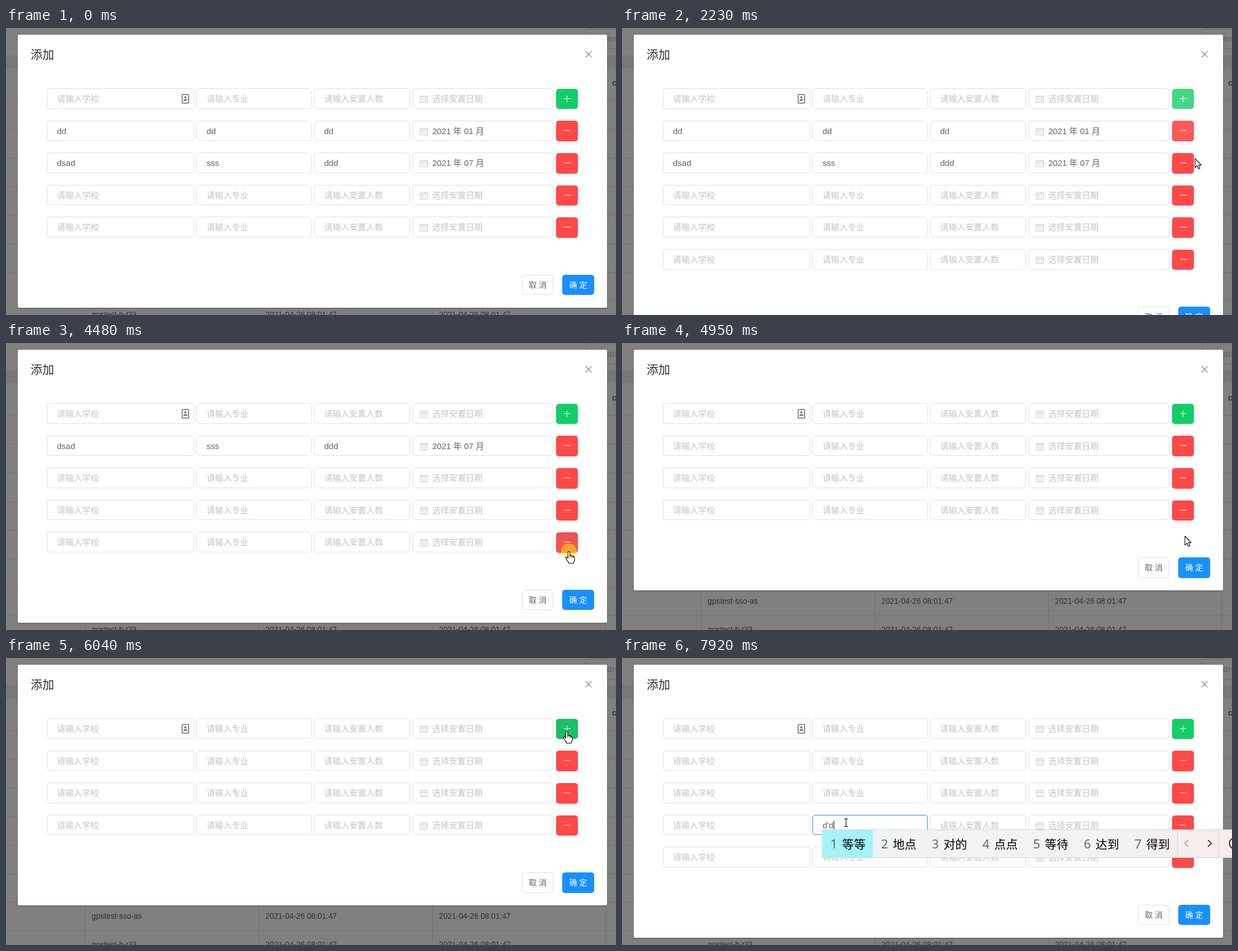
Write an HTML page that moves like this. It is 1089 px wide and 514 px high and loops after 8 s.

```html
<!DOCTYPE html>
<html lang="zh-CN">
<head>
<meta charset="utf-8">
<title>添加</title>
<style>
html, body { margin: 0; width: 100%; height: 100%; overflow: hidden; }
body { position: relative; background: #808080; font: 15px/35px "Liberation Sans", "Noto Sans CJK SC", "Noto Sans CJK", sans-serif; color: #606266; }
body *, svg { position: absolute; box-sizing: border-box; white-space: nowrap; }
[hidden] { display: none !important; }
svg { overflow: visible; fill: none; }
svg * { position: static; }

.band { left: 0; right: 0; top: 49px; height: 23px; background: #787878; }
.hline { left: 0; right: 0; height: 1px; background: #717274; }
.vline { top: 72px; bottom: 0; width: 1px; background: #717274; }
.cell { font-size: 13.75px; line-height: 20px; color: #2f3032; }
.search { left: 1035px; top: 1px; width: 200px; height: 37px; border: 1px solid #6a6c70; border-radius: 5px; padding-left: 17px; font-size: 16px; }

.modal { left: 21px; top: 12px; width: 1052px; background: #fff; border-radius: 2px; box-shadow: 0 1px 3px rgba(0,0,0,.3); }
.title { left: 44px; top: 30px; font-size: 21px; color: #303133; }
.field { height: 36.6px; border: 1px solid #dcdfe6; border-radius: 5px; background: #fff; }
.field span { left: 17px; top: 0; }
.date span { left: 34px; }
.field .ph { color: #c0c4cc; }
.field.over { border-color: #c0c4cc; }
.field.focus { border-color: #1890ff; }
.date svg { left: 12px; top: 11px; stroke: #c0c4cc; }
.btn { border-radius: 5px; height: 36.6px; color: #fff; }
.op { left: 982px; width: 39.3px; }
.op svg { left: 20px; top: 18px; stroke: #fff; }
.foot { left: 0; }
.foot .btn { top: 0; font-size: 14px; line-height: 37px; text-align: center; }
.foot .cancel { left: 921.4px; width: 56px; border: 1px solid #dcdfe6; color: #606266; line-height: 35px; }
.ok { left: 993px; width: 57px; }
.caret { top: 291px; width: 1px; height: 16px; background: #222; }

.ime { left: 357px; top: 307px; height: 51px; display: flex; background: linear-gradient(90deg, #eff3f4, #f3f3f4 60%, #f6ebe9); border: solid #d4d4d4; border-width: 1px 0; }
.ime > * { position: relative; height: 49px; flex: none; }
.cand { padding: 0 12.5px 0 15px; font-size: 21px; line-height: 48px; color: #000; }
.cand:first-child { background: #a6f2f9; }
.cand b { position: static; display: inline-block; width: 21px; font: 22px/48px "Open Sans", "Noto Sans", sans-serif; color: #5c5c5c; }
.nav { width: 74px; border-left: 1px solid #d4d4d4; }
.nav svg { left: 0; top: 24px; stroke: #111; stroke-width: 1.6; }
.dot { width: 28px; height: 28px; margin: -14px; border-radius: 50%; background: rgba(255,240,0,.52); }
</style>
</head>
<body>
<script>
const add = (parent, cls, style = {}, html = '') => {
  const el = document.createElement('div');
  el.className = cls;
  el.innerHTML = html;
  Object.assign(el.style, style);
  parent.append(el);
  return el;
};
const px = v => v + 'px';
const svg = (content, attrs = '') => `<svg width="1" height="1" ${attrs}>${content}</svg>`;
const mix = (a, b, k) => a.map((v, i) => v + (b[i] - v) * k);
const body = document.body;

// Dimmed page behind the dialog
add(body, 'band');
add(body, 'search', {}, 'Search');
for (let i = 0; i < 8; i++) add(body, 'hline', { top: px(Math.round(130.2 + 51.15 * i)) });
for (let i = 0; i < 4; i++) add(body, 'vline', { left: px(Math.round(141 + 309.8 * i)) });
add(body, 'cell', { left: '1082px', top: '89px', fontWeight: 'bold' }, 'create');
['gpstest-ht-t33', 'gpstest-sso-as', 'gpstest-b-t33'].forEach((name, i) =>
  [name, '2021-04-26 08:01:47', '2021-04-26 08:01:47'].forEach((text, j) =>
    add(body, 'cell', { left: px(153 + 310 * j), top: px(402 + Math.round(51.15 * i)) }, text)));

// Dialog
const modal = add(body, 'modal');
add(body, 'title', {}, '添加');
add(body, '', { left: '1040px', top: '47px' },
  svg('<path d="M-5.5-5.5 5.5 5.5M-5.5 5.5 5.5-5.5" stroke="#85888e" stroke-width="1.3"/>'));

const pitch = 57.6;
const columns = [[73, 336, '请输入学校'], [340, 546, '请输入专业'], [550, 721, '请输入安置人数'], [726, 977, '选择安置日期']];
const filled = [['dd', 'dd', 'dd', '2021 年 01 月'], ['dsad', 'sss', 'ddd', '2021 年 07 月']];
const calendar = svg('<path d="M.5 2.5H13.5V13.5H.5ZM.5 5.5H13.5M3.5.5V3.5M10.5.5V3.5"/>' +
  '<path d="M3 8.5H11M3 11H11" stroke-dasharray="2 1"/>');
const green = [19, 206, 102], red = [255, 73, 73], blue = [24, 144, 255];
const white = [255, 255, 255], black = [0, 0, 0];

const rows = Array.from({ length: 6 }, (_, i) => {
  const el = add(body, '', { left: 0, top: 0 });
  const top = 108 + pitch * i, y = top + .8;
  const fields = columns.map(([x0, x1], j) => {
    const box = add(el, j === 3 ? 'field date' : 'field',
      { left: px(x0), top: px(top), width: px(x1 - x0) }, '<span></span>' + (j === 3 ? calendar : ''));
    return { box, text: box.firstChild, rect: [x0, top, x1, top + 36.6] };
  });
  const btn = add(el, 'btn op', { top: px(y) }, svg(`<path d="M-6-.5H6${i ? '' : 'M-.5-6V5.5'}"/>`));
  return { el, fields, btn: { el: btn, color: i ? red : green, rect: [982, y, 1021.3, y + 36.6] } };
});
add(body, '', { left: '313px', top: '118px' }, svg(
  '<rect x="1.5" y="1" width="11.5" height="15.5" rx="1.5" stroke="#8a8a8a" stroke-width="2"/>' +
  '<path d="M4 12.5V10.5Q7.2 8 10.5 10.5V12.5Z" fill="#777"/><circle cx="7.2" cy="6.3" r="2" fill="#777"/>'));

const foot = add(body, 'foot');
add(foot, 'btn cancel', {}, '取 消');
const ok = { el: add(foot, 'btn ok', {}, '确 定'), color: blue };

// Input method bar
const caret = add(body, 'caret');
const makeIme = words => add(body, 'ime', {},
  words.split(' ').map((w, i) => `<div class="cand"><b>${i + 1}</b>${w}</div>`).join('') +
  `<div class="nav">${svg('<path d="M19-6 13 0 19 6" stroke="#999"/><path d="M54-6 60 0 54 6"/>')}</div>` +
  `<div class="nav">${svg('<circle cx="29" cy="0" r="10.5"/><path d="M24 3Q29 8 34 3M25.5-4V-2M32.5-4V-2"/>')}</div>`);
const imes = { 'd': makeIme('的 都 大 到 等 点 对'), "d'd": makeIme('等等 地点 对的 点点 等待 达到 得到') };

// Pointer: arrow, hand, text beam
const dot = add(body, 'dot');
const pointer = add(body, '', { left: 0, top: 0 }, svg(
  '<path d="M0 0V16L3.7 12.6 6.2 18.3 8.7 17.2 6.2 11.6H11.2Z"/>' +
  '<path d="M-1.7 2Q-1.6.3 0 .3T1.8 2V7.3Q4.3 6.6 5 8.3 7.2 7.8 7.7 9.3 10 9 10 11.5V15Q10 17.5 8.2 19.5V21.5H-.6V20Q-3 17.5-4.2 14.5L-6 11.8Q-6.3 10-4.5 10.2T-1.7 13ZM1.8 7.3V11M5 8.3V11.5M7.7 9.3V12"/>' +
  '<path d="M-3.5-7H-1L0-6 1-7H3.5M0-6V6M-3.5 7H-1L0 6 1 7H3.5" fill="none"/>',
  'style="fill:#fff;stroke:#000;stroke-width:1.1;stroke-linejoin:round"'));
const shapes = [...pointer.querySelectorAll('path')];

// Pointer moves: start, end, x, y
const moves = [
  [110, 110, 1015, 452], [110, 760, 1000, 137],                        // up to plus
  [1612, 1770, 1000, 196], [1850, 2000, 1002, 157],
  [2000, 2700, 1008, 497], [2700, 2840, 1010, 507],                    // down to confirm
  [3380, 3700, 1005, 401], [4170, 4290, 1005, 373], [4880, 5040, 1005, 300], // minus buttons
  [5220, 5330, 1007, 222], [5340, 5740, 1001, 146], [5740, 5810, 1001, 131], // plus again
  [6500, 6680, 985, 160], [6680, 7360, 400, 295]];                     // into a field
// Clicks: time, row added or removed
const clicks = [[1070, 1], [3790, -1], [4420, -1], [5050, -1], [5850, 1], [6200, 1], [7430, 0]];
const hold = 170;

const lastClick = t => clicks.findLast(([at]) => at <= t) || [-hold, 0];
const pressed = t => t - lastClick(t)[0] < hold;
const plusFocused = t => lastClick(t)[1] > 0;
const inside = ([x0, y0, x1, y1], [x, y]) => x >= x0 && x < x1 && y >= y0 && y < y1;

// The screen refreshes every 78 ms
const snap = t => 110 + 78 * Math.floor((t - 110) / 78);

function position(t) {
  let at = [1015, 600];
  for (const [start, end, ...to] of moves) {
    if (t < start) break;
    const k = end > start ? Math.min(1, (t - start) / (end - start)) : 1;
    const bow = .07 * Math.max(0, to[1] - at[1]) * Math.sin(Math.PI * k);
    at = mix(at, to, k * k * (3 - 2 * k));
    at[0] += bow;
  }
  return at;
}

// Share of the last 100 ms in which a condition held, i.e. a 0.1 s transition
function recent(t, test) {
  let hits = 0;
  for (let k = 0; k < 10; k++) hits += test(t - 10 * k);
  return hits / 10;
}

function paint({ el, rect, color }, t, at, focused) {
  const lit = recent(t, u => inside(rect, position(u)) || focused(u));
  const down = inside(rect, at) ? recent(t, pressed) : 0;
  const shade = mix(mix(color, white, .2 * lit), mix(color, black, .1), down);
  el.style.background = `rgb(${shade.map(Math.round)})`;
}

function draw(t) {
  const at = position(t);
  const done = clicks.filter(([time]) => time + hold <= t).map(c => c[1]);
  const count = done.reduce((sum, d) => sum + d, 5);
  const removed = done.filter(d => d < 0).length;
  const editing = t >= 7430;
  const typed = t >= 7900 ? "d'd" : t >= 7680 ? 'd' : '';
  const bottom = 213 + pitch * count, okTop = bottom - 59.2;
  let shape = 0;

  modal.style.height = px(Math.round(bottom) - 12);
  foot.style.top = px(okTop);
  ok.rect = [993, okTop, 1050, okTop + 36.6];
  if (inside(ok.rect, at)) shape = 1;
  paint(ok, t, at, () => false);

  rows.forEach(({ el, fields, btn }, i) => {
    el.hidden = i >= count;
    if (el.hidden) return;
    paint(btn, t, at, u => !i && plusFocused(u));
    if (inside(btn.rect, at)) shape = 1;
    fields.forEach(({ box, text, rect }, j) => {
      const target = i === 3 && j === 1;
      const value = target && typed || (i && filled[i - 1 + removed]?.[j]);
      const over = inside(rect, at);
      text.textContent = value || columns[j][2];
      text.className = value ? '' : 'ph';
      box.classList.toggle('over', over);
      box.classList.toggle('focus', target && editing);
      if (over) shape = 2;
    });
  });

  caret.hidden = !editing;
  caret.style.left = px(358 + 6.7 * typed.length);
  for (const key in imes) imes[key].hidden = key !== typed;

  pointer.style.transform = dot.style.transform = `translate(${at.map(v => px(Math.round(v)))})`;
  dot.hidden = !pressed(t);
  shapes.forEach((s, i) => s.style.display = i === shape ? '' : 'none');
}

const start = performance.now();
function tick() {
  draw(snap((performance.now() - start) % 8000));
  requestAnimationFrame(tick);
}
tick();
</script>
</body>
</html>
```
